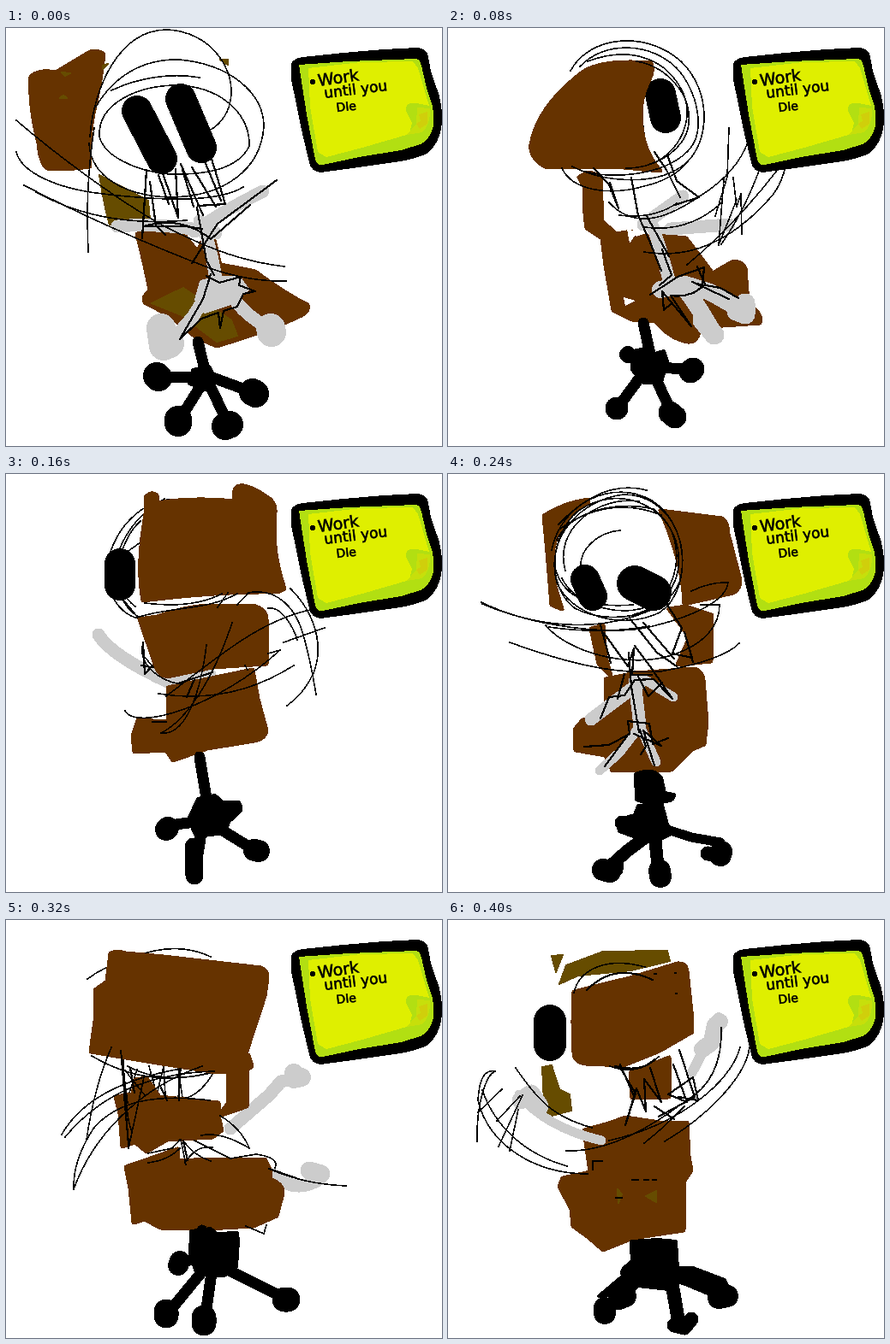
Animation, 509 px wide and 489 px high, one loop 480 ms. Source, as an HTML page:

```html
<!DOCTYPE html>
<html lang="en">
<head>
<meta charset="utf-8">
<title>Spinning office chair</title>
<style>
html, body { margin: 0; width: 100%; height: 100%; overflow: hidden; background: #fff; }
svg { display: block; width: 100vw; height: 100vh; }
path { fill: none; stroke: #000; stroke-width: 1.6; stroke-linecap: round; stroke-linejoin: round; }
.brown { fill: #630; stroke: #630; stroke-width: 5; }
.olive { fill: #664c00; stroke: #664c00; stroke-width: 2; }
.bone { stroke: #ccc; stroke-width: 15; }
.foot { stroke: #ccc; stroke-width: 34; }
.flesh { fill: #ccc; stroke: #ccc; stroke-width: 4; }
.solid { fill: #000; stroke-width: 4; }
.leg { stroke-width: 13; }
.knob { stroke-width: 32; }
.eye { stroke-width: 36; }
.bold { stroke-width: 2.2; }
.pose { visibility: hidden; }
text { font-family: "DejaVu Sans", sans-serif; stroke: #000; stroke-width: .6; }
</style>
</head>
<body>
<svg viewBox="0 0 509 489" shape-rendering="crispEdges">
  <g class="pose">
    <path class="brown" d="M29 57Q38 48 58 52Q88 34 98 28Q110 26 114 31Q111 62 102 100Q96 130 98 162Q70 166 48 164Q40 158 38 135Q27 90 29 57Z"/>
    <path class="olive" d="M65 52l10 1-6 3zM63 82q4-6 8 0zM113 44l6-2-6 6zM250 37h9v6zM109 172L166 202 168 224 121 230Q116 215 109 172Z"/>
    <path class="brown" d="M153 241Q184 231 208 242L224 262 234 236 240 236 250 277Q278 282 291 285Q324 310 352 324Q354 331 345 336Q310 353 246 372L222 362Q195 337 162 321Q159 314 168 307Q162 275 153 241Z"/>
    <path class="olive" d="M170 322L207 304 263 342 270 360 246 367 205 336Z"/>
    <path class="bone" d="M130 232Q185 227 245 240M220 238Q252 215 300 191M226 226Q238 248 245 294"/>
    <path class="bone" d="M238 304Q231 318 218 338L190 370M264 312Q272 330 304 350"/>
    <path class="flesh" d="M228 297L246 292 272 292 282 306 262 322 232 332 222 318Z"/>
    <path class="foot" d="M181 351l3 21 7-3M309 351l1 5"/>
    <path class="eye" d="M153 97L182 153M204 83L228 140"/>
    <path d="M98 127C102 72 131 2 188 2C240 4 269 50 262 85Q257 112 231 123M105 92C127 55 161 36 202 37C261 42 301 76 301 115C298 165 255 198 190 198C140 196 99 175 97 135"/>
    <path d="M109 127C107 89 152 66 205 67C260 72 285 107 284 138C270 168 225 172 190 171C150 167 115 150 109 127M123 73C155 58 193 52 226 58"/>
    <path d="M12 108C62 151 131 202 185 232C244 262 282 274 325 279M21 184C102 226 181 259 238 281Q284 297 327 296M12 145C18 169 59 188 113 194C198 204 251 202 277 186M103 117C95 170 94 210 96 262M35 192Q110 234 211 225"/>
    <path class="bold" d="M164 166L159 246M168 180L175 231 186 242M178 172L190 206M183 170L201 222 198 165M206 166L219 209M204 159L230 219M217 163L245 209M232 156L251 202M240 153L256 206 224 208M229 235L210 232 160 232M223 210L234 272 243 289M217 275L247 229 316 178M161 232Q205 219 239 247L285 207"/>
    <path class="bold" d="M239 288L230 317 203 364 228 340 248 333 250 351 254 331 270 326 277 311 291 308 272 301 274 291 249 298 234 290"/>
    <path class="leg" d="M224 367L234 408 178 408M234 408L202 459M234 410L260 464M236 407L290 427"/>
    <path class="knob" d="M176 407l2 2M201 458v4M256 466l5-2M288 426l3 2"/>
    <path class="solid" d="M218 400L237 396 245 410 233 423 214 416Z"/>
  </g>

  <g class="pose">
    <path class="eye" d="M248 77L254 105"/><path class="leg" d="M222 114l2 16"/>
    <path class="bone" d="M228 230L274 197M249 246L260 235 328 230"/>
    <path class="brown" d="M97 136Q105 93 153 55Q174 36 237 41Q240 50 236 58Q222 84 226 116Q229 146 248 167L194 162 113 162Q95 151 97 136Z"/>
    <path class="brown" d="M153 175Q166 164 178 176L180 226 196 241 214 238 219 247 230 243Q262 244 278 246L309 287 331 274Q343 272 347 281L350 322Q368 335 364 345L293 350Q293 368 280 367Q260 364 242 343L215 341 193 330 184 278 180 246 162 234Q158 210 160 187Z"/>
    <path style="fill:#fff;stroke:none" d="M209 235l12 4-9 13zM205 315l14 4-12 6z"/>
    <path class="bone" d="M236 225Q246 249 258 295"/>
    <path class="bone" style="stroke-width:20" d="M248 306L273 301Q289 319 311 359M277 300L306 309 336 326"/>
    <path class="bone" style="stroke-width:23" d="M297 342L311 359M337 331L347 335 347 322"/>
    <path d="M143 50C166 8 232 3 272 39C309 75 305 133 278 158C244 187 181 180 145 162M154 45C185 14 237 17 267 47C291 73 303 122 279 145C249 174 190 176 161 168M163 39C213 20 251 37 269 66C294 102 269 149 236 159M133 164C145 190 188 197 229 185Q263 177 278 158M208 164C245 164 278 140 281 112C285 75 252 44 220 39"/>
    <path class="bold" d="M170 164L188 183 199 211 189 181M214 175L222 219 236 251 249 284M241 145L255 166 271 198M256 148L267 179 293 198 265 207M232 220L258 267"/>
    <path d="M188 204C221 240 263 218 295 196Q338 169 351 131M200 219Q240 224 267 205M229 262C299 274 349 229 375 200Q393 181 397 145M279 277C324 240 376 183 411 128M319 253Q351 208 374 136M328 117L326 174 312 220M322 177L316 254 337 201M333 175L337 209 342 194 343 241M230 233Q281 240 320 204"/>
    <path class="bold" d="M236 312L259 297 268 291 299 280 297 303Q281 316 260 313L284 349 250 308 252 330 261 322M250 259L261 289 247 301M285 297L328 317M289 299L318 304 339 316M291 279L300 300 287 310"/>
    <path class="leg" d="M228 345L237 386M232 393L210 380M232 398L199 443M237 398L262 452M238 397L284 399"/>
    <path class="solid" d="M216 378L234 374 238 382 252 378 256 390 249 414 228 415 215 400Z"/>
    <path class="knob" style="stroke-width:27" d="M197 445h0M283 402l3-3M259 450l6 5"/><path d="M210 382h0" style="stroke-width:20"/>
  </g>

  <g class="pose">
    <path d="M209 31C166 22 127 60 119 103C114 140 133 165 158 170M185 29C145 51 123 94 128 123Q134 155 156 168M157 55C129 80 122 135 151 155M139 93L158 79M137 147L154 168"/>
    <path class="eye" d="M133 105v25"/>
    <path class="bone" d="M108 188Q123 213 193 245L238 235"/>
    <path class="brown" d="M163 27Q170 20 176 25L177 34Q219 27 267 32Q264 15 273 14Q284 12 309 30Q315 36 314 48Q310 91 325 134L317 138Q247 137 160 148Q153 111 161 60L164 40Z"/>
    <path class="brown" d="M156 170L176 167Q213 154 242 154L288 154Q304 158 304 170L304 222 241 226 188 237Q178 235 175 225Z"/>
    <path class="brown" d="M189 250L240 239 288 229 294 263 304 300Q302 310 290 312L235 321 195 335 187 323 150 325 148 306 154 288 189 290Z"/>
    <path d="M153 168C190 155 235 160 270 140M162 151Q218 158 252 140M160 197C153 225 182 243 205 246M160 212l12 14-14-2M171 290h16M247 156l12-17M270 153l12-13"/>
    <path class="bold" d="M160 197l2 37 9-10M201 245L241 232 229 236M220 240l-9 21"/>
    <path d="M139 277C152 301 248 272 320 206L306 210M178 257C240 267 292 252 336 224M187 260C253 209 304 166 366 157M181 303C214 307 229 242 234 200M181 303C211 288 242 240 264 174M324 197L372 180M306 157C321 154 335 178 340 194M283 139C318 132 340 159 348 192Q355 216 362 258M332 134C362 164 371 202 359 233Q348 257 328 271M279 224l3 5"/>
    <path class="leg" d="M226 331L235 386M235 405L184 412M230 407L220 470M235 406L290 440M241 394L270 390"/>
    <path class="solid" d="M224 380L244 376 253 384 272 384 274 394 260 407 256 420 222 424 213 404Z"/>
    <path class="knob" style="stroke-width:26" d="M189 414l-2 2M290 440l5 1"/><path d="M219 436l1 34" style="stroke-width:21"/>
  </g>

  <g class="pose">
    <path class="brown" d="M112 49Q135 34 163 30L164 33Q130 52 123 87L124 128 133 158 121 153Q116 89 112 49ZM248 43L320 52Q326 55 327 70L341 124Q341 135 333 139L276 152Q274 101 248 43ZM258 158L278 155 308 165 307 219 268 223 282 191ZM167 181L181 177 184 214 190 236 176 222Z"/>
    <path class="brown" d="M184 240L219 233 288 228Q297 231 298 241L302 290 299 316 285 322 261 346 192 347 184 329 149 323 148 299 157 288 184 281Z"/>
    <path class="bone" d="M167 287L223 245M218 243L224 295"/>
    <path class="bone" style="stroke-width:11" d="M221 299L200 326 177 347M226 299L243 337M227 239L263 261"/>
    <path class="eye" style="stroke-width:34" d="M160 123L169 143"/><path class="eye" style="stroke-width:42" d="M218 128L240 139"/>
    <path d="M121 89C132 33 193 5 238 31C284 60 284 138 247 162C203 184 143 165 127 127C113 75 154 30 205 24C258 24 284 81 270 127C254 167 188 178 148 157C114 131 119 72 151 44C198 10 258 36 268 86C275 126 253 155 218 164"/>
    <path d="M127 77C144 43 197 31 240 41C276 69 273 119 247 148C211 173 149 156 133 122M137 113C123 65 174 25 223 32M155 112C152 88 175 68 201 66M129 59Q180 5 232 19M131 64Q188 24 249 48M124 104Q133 160 216 153"/>
    <path d="M39 150C97 179 194 190 239 178C288 166 325 148 327 127Q307 126 284 137M72 197C136 220 191 235 248 231Q321 218 340 198M114 177C140 209 214 229 264 211C299 199 317 178 317 153L295 153M40 152C118 185 187 183 244 156M118 179Q179 188 235 178"/>
    <path class="bold" d="M178 177L190 221M182 186L210 225 217 204 215 235 238 235M213 170L244 209 267 225M228 174L264 216M256 153L273 180 262 210 285 215 276 185 286 220M218 201L238 228 262 263 240 240 218 241 206 259 188 261 178 286M211 209L214 249 223 302"/>
    <path class="bold" d="M159 319L188 317 212 304 210 289 235 292 239 316 257 309M211 304L183 342M224 299L231 319 225 328M217 304L249 318 228 300 241 341M206 234L198 263M222 237L234 260 250 244"/>
    <path class="solid" d="M219 351Q230 346 242 349L249 355 253 373 264 375Q264 382 255 383L235 386 220 381ZM222 388L250 387 256 410 263 420 240 431 222 426 200 418 197 405 218 399Z"/>
    <path class="leg" style="stroke-width:15" d="M232 424L208 442 188 460M241 420L246 468"/>
    <path class="leg" style="stroke-width:11" d="M250 414L284 425 318 431"/>
    <path class="knob" style="stroke-width:26" d="M181 463l8 2M247 464l1 7M319 442l-1 4"/><path d="M203 408h0M196 455v8M303 444l10 1" style="stroke-width:17"/>
  </g>

  <g class="pose">
    <path d="M95 69Q114 55 131 51M150 43Q199 24 239 43M100 159Q173 202 253 174M142 171Q182 193 239 179M153 175L144 202M201 174l5 34M167 171l9 33 8-33 2 34M204 174l-3 35M244 175Q228 205 207 209"/>
    <path class="bone" d="M262 244L307 205 321 189 345 184"/><path class="bone" style="stroke-width:22" d="M336 179v7l9-2"/>
    <path class="bone" d="M311 298Q336 319 361 306"/><path class="bone" style="stroke-width:21" d="M354 293l14 4-7 6"/>
    <path class="brown" d="M122 39Q130 36 140 39L184 43 298 56Q306 60 305 68L302 89 285 141 274 177 239 177 170 166 99 154 104 118 104 82 118 72Z"/>
    <path class="brown" d="M275 158L283 158 287 171 281 176 281 218 249 229 260 213 259 178 273 176Z"/>
    <path class="brown" d="M128 207L148 204 151 187 164 185 179 207 248 214 248 229 252 246 241 254 188 257 164 271 151 260 136 265 133 227Z"/>
    <path class="brown" d="M140 289L166 280 200 268 200 282 239 280 302 280 309 293 308 303Q324 309 323 320L316 346 289 358 235 361 180 360 162 350 149 354 145 314Z"/>
    <path d="M123 149Q103 195 94 257M65 251C91 205 147 184 204 174M69 254C112 202 170 179 243 177M79 315C101 254 154 197 229 171M79 315Q78 281 102 244C129 212 174 203 238 211M134 153l9 114 18-83M134 153l8 61M137 164Q140 235 147 247M139 176l23 29M250 229Q275 244 284 267Q251 247 228 252M204 257l6 29M207 258Q218 275 239 282M209 284Q222 263 241 266M220 258l42 21 30-5Q320 278 314 290M307 291Q347 309 397 311M280 358l21 9 3-10M166 273l28-6 9-10M166 284q24-3 37-17"/>
    <path class="bold" d="M145 173l5 29M202 176v35M181 196l7 15M138 205l5 57M207 259l5 22M307 291l32 11"/>
    <path class="leg" d="M229 363L236 390 203 402M240 398L189 460M241 405L232 469M249 404L326 443"/>
    <path class="solid" d="M216 364L239 361 246 367 270 366 271 376 269 406 255 416 223 415 215 392Z"/>
    <path class="knob" style="stroke-width:29" d="M187 458v5M231 465v7M325 444h4"/><path d="M203 399l-2 5" style="stroke-width:24"/>
  </g>

  <g class="pose">
    <path class="olive" d="M121 42l13-1-8 20zM130 75L138 53 181 37 256 36 259 48 214 59 152 65ZM110 172L121 170 130 198 142 204 144 223 113 231Z"/>
    <path class="eye" style="stroke-width:38" d="M119 118v28"/>
    <path class="brown" d="M147 84L212 68 268 51Q278 50 279 60L284 107 285 131 247 153 205 170 161 168Q147 166 147 155Q145 119 147 84ZM213 179L258 161 258 207 215 208Z"/>
    <path class="brown" d="M159 246L188 238 207 231 247 237 279 237 281 276 284 293 276 305 275 363 216 372 181 386 164 371 146 358 144 338 130 312 134 302 166 295Z"/>
    <path class="olive" d="M198 315l5 6-4 10zM231 323l12-6v13z"/>
    <path class="bone" style="stroke-width:11" d="M83 204Q113 242 179 258"/><path class="bone" style="stroke-width:21" d="M85 211l12-8 10 15"/>
    <path class="bone" style="stroke-width:12" d="M285 178L299 151 310 142 316 114"/><path class="bone" style="stroke-width:20" d="M297 151l11-8 4-20 5-4"/>
    <path d="M147 85C153 59 183 42 230 55M189 171Q222 183 246 160"/>
    <path class="bold" d="M162 82Q194 49 239 70M195 171Q226 179 241 163"/>
    <path d="M79 173C105 211 122 230 168 243M34 259C33 212 45 181 55 177Q37 173 35 211C48 265 103 297 163 297M40 199C55 242 90 274 139 288M35 225L63 198M59 265L87 205M72 270L82 222M57 235L84 206M138 270C194 272 249 233 277 212Q321 187 319 126M188 258C273 239 331 188 341 149M229 261Q251 244 276 218M253 259C299 232 347 186 352 149"/>
    <path class="bold" d="M200 171L219 203 207 240 220 197 231 224 229 186 249 213 236 173M263 169L279 213 257 204 286 184 292 211 269 207M270 152L288 207 246 230M241 218l23 15M201 169l16 37M169 292v-10h11M196 325h7M215 304h7M229 304h5M239 304h4M241 63h2M265 62h1M266 86h1"/>
    <path class="leg" style="stroke-width:16" d="M232 391L209 412M235 407L187 454M258 405L269 469M254 410L319 437"/>
    <path class="solid" d="M214 376L245 374 266 376 268 407 286 407 323 421 329 433 308 436 264 422 258 432 212 427 196 439 176 440 201 419 215 405Z"/>
    <path class="knob" style="stroke-width:26" d="M183 454v6M316 442l10-2M200 443l7-3"/><path d="M264 474l12 3 8-10" style="stroke-width:17"/>
  </g>

  <g id="note">
    <path class="solid" d="M335 42Q338 37 347 36L394 31 441 27 480 25Q490 26 491 34L494 51 504 80Q508 98 507 110Q505 133 491 145Q478 151 460 154L412 161 367 167Q358 166 356 157L347 119 335 60Z"/>
    <path style="fill:#b2df12;stroke:none" d="M342 43L400 39 478 36Q483 36 485 44L491 70 498 92Q501 112 497 121Q492 132 484 136L461 143 412 151 370 160Q363 161 361 154L351 101Z"/>
    <path style="fill:#dfef00;stroke:none" d="M353 47L414 40 475 39 481 47 494 91 479 88Q466 86 467 97L474 111 471 124 416 140 374 151 364 145 355 92Z"/>
    <path style="fill:#c7df0b;stroke:none" d="M480 93L495 94Q496 112 486 122L468 125 479 112Z"/>
    <path style="fill:#d0cf0b;stroke:none" d="M482 101L492 98 492 112 483 118 479 112 484 109Z"/>
    <circle cx="358" cy="63" r="3"/>
    <text transform="translate(365 68) rotate(-8)" font-size="19">Work</text>
    <text transform="translate(372 82) rotate(-7)" font-size="17">until you</text>
    <text transform="translate(386 98) rotate(-6)" font-size="14">DIe</text>
  </g>
</svg>
<script>
const poses = document.querySelectorAll(".pose");
const STEP = 80;

function draw(now) {
  const current = Math.floor(now / STEP) % poses.length;
  poses.forEach((pose, i) => { pose.style.visibility = i === current ? "visible" : "hidden"; });
  requestAnimationFrame(draw);
}
draw(0);
</script>
</body>
</html>
```
